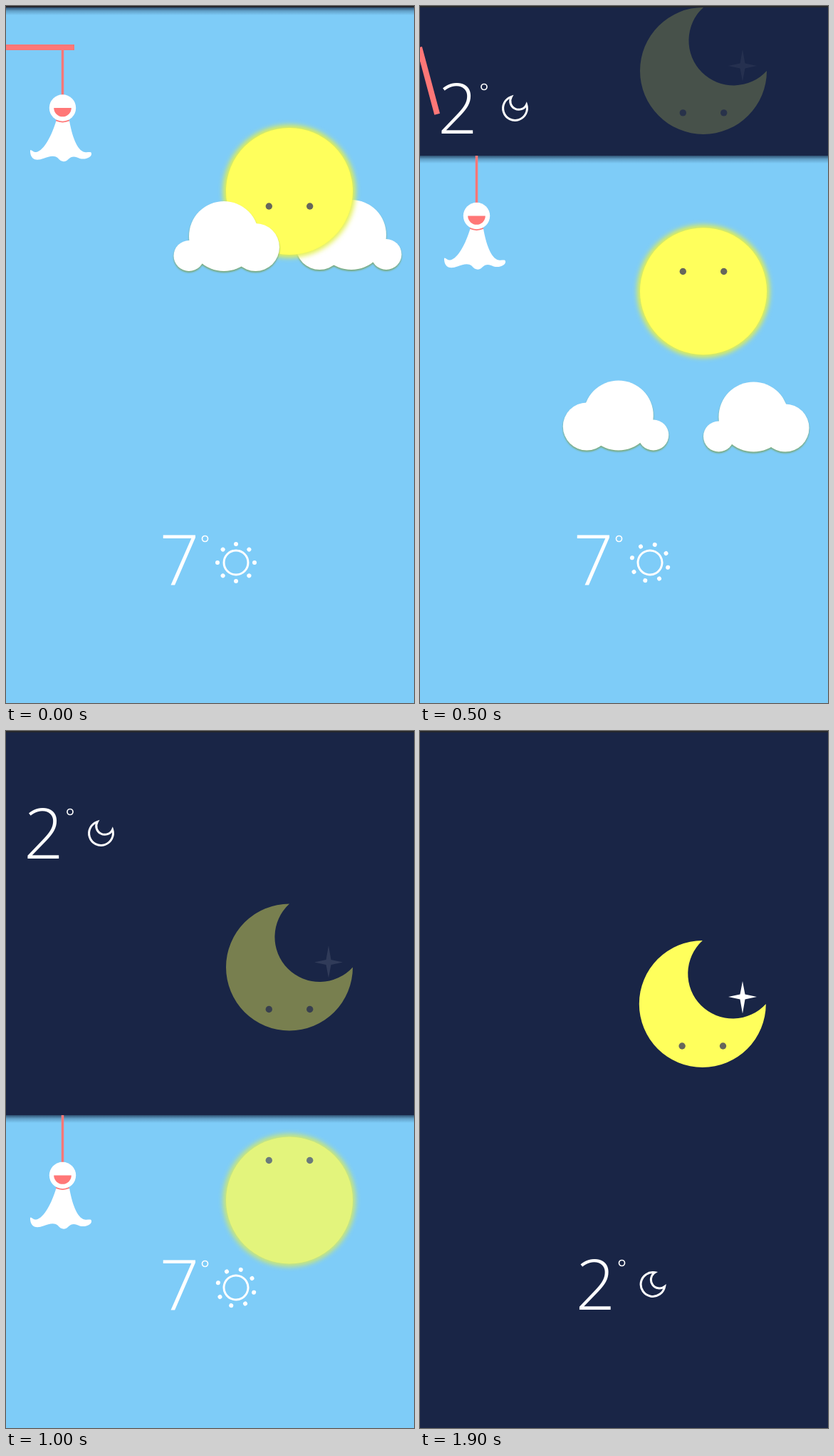
An HTML page for the animation above (2 s loop, 573 by 978 pixels).

```html
<!DOCTYPE html>
<html lang="en">
<head>
<meta charset="utf-8">
<title>Day and night weather</title>
<style>
  html, body { margin: 0; width: 100%; height: 100%; overflow: hidden; background: #7eccf8; }
  svg { display: block; width: 100%; height: 100%; }
  text { font: 300 98px "Open Sans", "Noto Sans", sans-serif; fill: #fff; text-anchor: middle; }
  .cloud { fill: #fff; filter: drop-shadow(0 2px 1px #79a878); }
  .line { fill: none; stroke: #fff; stroke-width: 3; vector-effect: non-scaling-stroke; }
  .degree { fill: none; stroke: #fff; stroke-width: 1.7; }
  .eye { fill: #66665c; }
  .yellow { fill: #ffff5c; }
  .pink { fill: #ff7777; }
  .white { fill: #fff; }
</style>
</head>
<body>
<svg viewBox="0 0 573 978">
  <defs>
    <filter id="blur" x="-20%" y="-20%" width="140%" height="140%"><feGaussianBlur stdDeviation="3.5"/></filter>
    <linearGradient id="shade" x2="0" y2="1">
      <stop offset="0" stop-color="#0c1c38" stop-opacity=".7"/>
      <stop offset=".45" stop-color="#0c1c38" stop-opacity=".25"/>
      <stop offset="1" stop-color="#0c1c38" stop-opacity="0"/>
    </linearGradient>
    <clipPath id="nightClip"><rect id="clipRect" width="573"/></clipPath>
    <path id="crescent" d="M0-89A89 89 0 1 0 89 0A63 63 0 1 1 0-89Z"/>
    <g id="eyePair"><circle class="eye" cx="-28.7" r="4.7"/><circle class="eye" cx="28.7" r="4.7"/></g>
    <g id="cloudShape"><circle r="49"/><circle cx="-49" cy="27.5" r="21.5"/><circle cx="44.5" cy="15.5" r="33.5"/></g>
  </defs>

  <rect width="573" height="978" fill="#7eccf8"/>
  <g id="cloudB" class="cloud"><use href="#cloudShape" transform="scale(-1 1)"/></g>
  <g id="sun">
    <circle r="93" fill="#e4f050" filter="url(#blur)"/>
    <circle class="yellow" r="89"/>
    <use id="sunEyes" href="#eyePair"/>
  </g>
  <g id="cloudA" class="cloud"><use href="#cloudShape"/></g>

  <g id="dayInfo">
    <text x="243.5" y="812">7</text>
    <circle class="degree" cx="279.5" cy="747.5" r="4"/>
    <g id="sunIcon"><circle class="line" r="17"/></g>
  </g>

  <rect id="shadow" width="573" height="11" fill="url(#shade)"/>
  <g clip-path="url(#nightClip)">
    <rect width="573" height="978" fill="#192546"/>
    <g id="moon">
      <use href="#crescent" class="yellow"/>
      <use href="#eyePair" y="59"/>
    </g>
    <path id="star" class="white" d="M0-23.5L3.5-3.5 20 0 3.5 3.5 0 22-3.5 3.5-20 0-3.5-3.5Z"/>
    <g id="nightInfo">
      <text x="246.5" y="812">2</text>
      <circle class="degree" cx="283.5" cy="746.5" r="4"/>
      <g id="moonIcon"><path class="line" transform="scale(.19)" d="M0-89A89 89 0 1 0 89 0A63 63 0 1 1 0-89Z"/></g>
    </g>
  </g>

  <path id="string" stroke="#ff7777" stroke-width="3.5"/>
  <g id="doll">
    <path class="white" d="M-9 18C-15 38-26 60-37 62C-43 62-46 55-45.5 62C-44 76-33 73-27 71C-19 68-12 66-7 70C-2 76 3 77 8 72C13 67 18 68 24 71C33 73 40 69 40.5 65C41 60 36 63 31 62C20 60 13 38 9.5 18Z"/>
    <path d="M-9 17Q0 21 9 17" fill="none" stroke="#ff7777" stroke-width="3"/>
    <circle class="white" r="18.7"/>
    <path class="pink" d="M-12.3 0H12.3A12.3 12.3 0 0 1-12.3 0Z"/>
  </g>
  <rect id="bar" class="pink" y="-4" width="97" height="8"/>
  <rect width="573" height="2" fill="#25272c"/>
</svg>
<script>
const $ = id => document.getElementById(id);
const set = (id, attrs) => { for (const k in attrs) $(id).setAttribute(k, attrs[k]); };
const place = (id, x, y, angle = 0) =>
  set(id, { transform: `translate(${x} ${y}) rotate(${angle})` });
const clamp = (v, low = 0, high = 1) => Math.min(high, Math.max(low, v));
const easeOut = p => 1 - (1 - p) ** 3;

// The drag changes speed at these beats (in tenths of a second).
const beats = [0, 3, 7, 10, 12];
function dragged(s, values) {
  const i = clamp(beats.findIndex(b => b > s), 0, 4) || 4;
  const p = (s - beats[i - 1]) / (beats[i] - beats[i - 1]);
  return values[i - 1] + (values[i] - values[i - 1]) * p;
}

for (let i = 0; i < 8; i++) {
  const dot = $('sunIcon').firstChild.cloneNode();
  dot.setAttribute('class', 'white');
  dot.setAttribute('r', 3);
  dot.setAttribute('transform', `rotate(${i * 45}) translate(26)`);
  $('sunIcon').append(dot);
}

// s: elapsed time in tenths of a second, 0 to 19.
function draw(s) {
  const panel = dragged(s, [2, 110, 310, 539, 789]);
  set('clipRect', { height: panel });
  set('shadow', { y: panel });

  place('sun', 398, dragged(s, [260, 304.5, 496, 658.5, 978]));
  set('sun', { opacity: clamp(1 - .235 * (s - 9.1)) });
  place('sunEyes', 0, Math.max(-56, 21 - 6 * s - .75 * s * s));

  // Clouds fall while crossing, gaining speed.
  place('cloudA', 306 + 29.5 * s + .6 * s * s, 323 + 45.7 * s + s * s);
  place('cloudB', 485 - 20.5 * s - 4.15 * s * s, 321 + 33.2 * s + 3.5 * s * s);

  // The moon descends with the panel, then settles with one sway.
  const fall = Math.min(s - 3, 7);
  const descent = 43.4 * fall + .524 * fall * fall;
  const settle = clamp((s - 12) / 7), sway = Math.sin(Math.PI * settle);
  const glow = clamp(.41 + .195 * (s - 10), .2);
  place('moon', 398 - 1.2 * easeOut(settle) - 2 * sway, 2 + descent + 51.5 * easeOut(settle), 30.5 * sway);
  set('moon', { opacity: glow });

  const arrive = clamp((s - 12) / 3);
  place('star', 453, -5 + descent + 48.5 * arrive, -30 * Math.max(0, s - 13));
  set('star', { opacity: Math.max(glow / 4, arrive) });

  // The icons snap between two poses.
  place('sunIcon', 323, 781, s < 5 ? 0 : 15);
  place('moonIcon', 327, 776.5, (s + 2) % 6 < 3 ? -18 : 10);
  set('dayInfo', { visibility: s < 11 ? 'visible' : 'hidden' });
  place('nightInfo', s < 14 ? -193.5 : 0, s < 14 ? -633 : 0);

  const head = Math.max(143, panel + 84.5);
  place('doll', 79.5, head);
  set('string', { d: `M79.5 ${Math.max(60, panel)}V${head - 17}` });
  place('bar', -1, 58, 15 * s);
  set('bar', { visibility: s < 6 ? 'visible' : 'hidden' });
}

function frame() {
  draw(Math.floor(performance.now() % 2000 / 100));
  requestAnimationFrame(frame);
}
frame();
</script>
</body>
</html>
```
